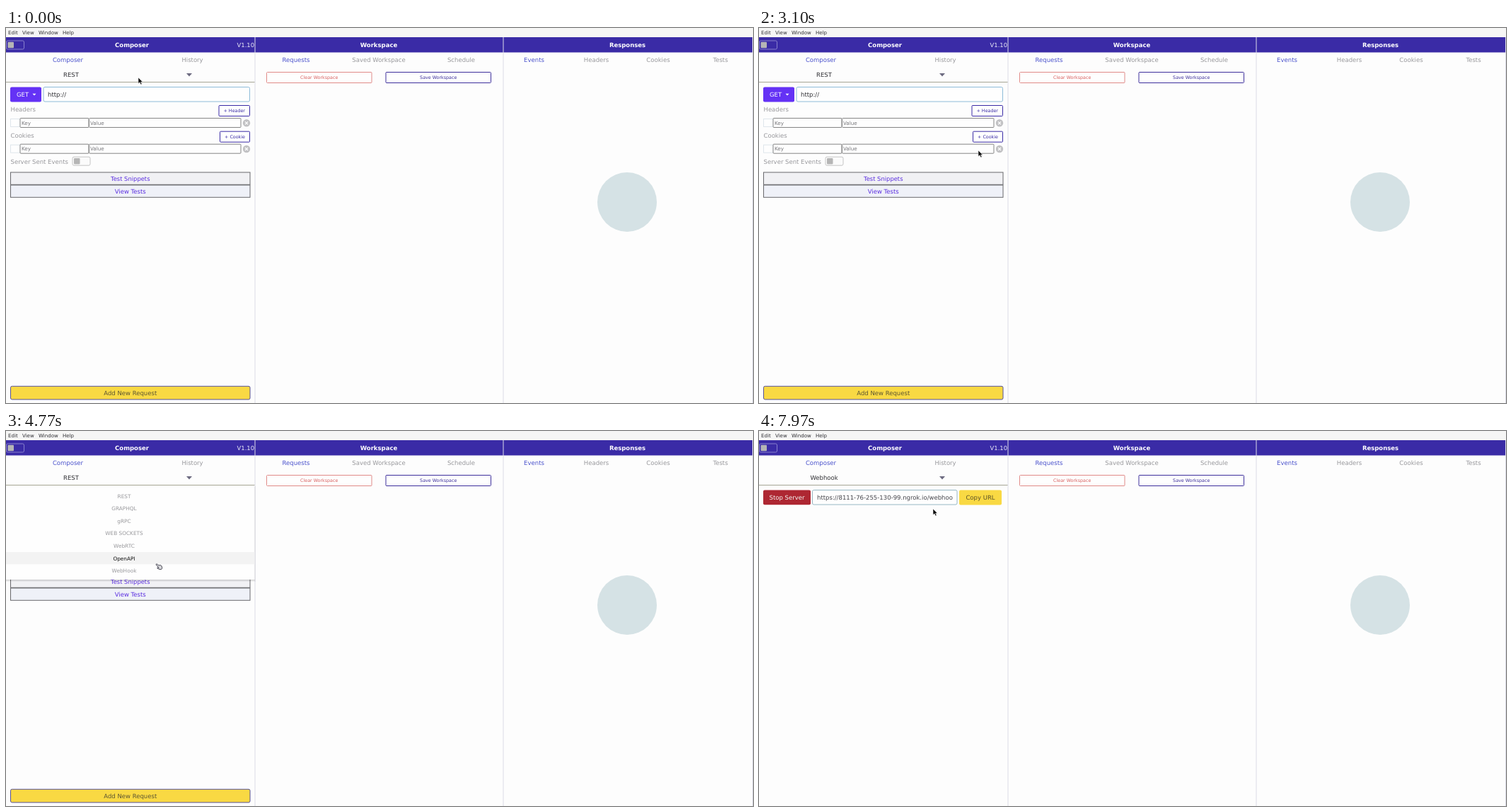
An HTML page for the animation above (8000 ms loop, 1056 by 530 pixels).

```html
<!DOCTYPE html>
<html lang="en">
<head>
<meta charset="utf-8">
<title>API composer</title>
<style>
  html, body { margin: 0; width: 100%; height: 100%; overflow: hidden; background: #fdfdfd; }
  svg { display: block; width: 1056px; height: 530px; font-family: "DejaVu Sans", sans-serif; text-rendering: geometricPrecision; }
</style>
</head>
<body>
<svg id="stage" viewBox="0 0 1056 530" xmlns="http://www.w3.org/2000/svg"></svg>
<script>
const LOOP = 8000;
const OPEN = 4030, HOVER = 4870, PICK = 5240, START = 6600, URL_SHOWN = 7200;
const INK = '#303034', GREY = '#98989c', BLUE = '#4a52cc', VIOLET = '#5b2ee0', NAVY = '#3a2ba6';

const stage = document.getElementById('stage');

function add(parent, tag, attrs, content) {
  const node = document.createElementNS(stage.namespaceURI, tag);
  for (const key in attrs) node.setAttribute(key, attrs[key]);
  if (content !== undefined) node.textContent = content;
  parent.appendChild(node);
  return node;
}
const group = (parent = stage) => add(parent, 'g', {});
const box = (parent, x1, y1, x2, y2, fill, stroke = 'none', rx = 0) =>
  add(parent, 'rect', { x: x1, y: y1, width: x2 - x1, height: y2 - y1, fill, stroke, rx });
// y is the middle of the capital letters
const text = (parent, x, y, content, fill, size = 8.5, anchor = 'middle', weight = 400) =>
  add(parent, 'text', { x, y: y + size * 0.365, fill, 'font-size': size, 'text-anchor': anchor, 'font-weight': weight }, content);
const show = (node, on) => node.setAttribute('visibility', on ? 'visible' : 'hidden');

function button(parent, x1, y1, x2, y2, label, color, fill = '#fefefe', stroke = color, size = 6.35, rx = 1) {
  box(parent, x1, y1, x2, y2, fill, stroke, rx);
  return text(parent, (x1 + x2) / 2, (y1 + y2) / 2, label, color, size);
}

function toggle(parent, x, y, fill, stroke) {
  box(parent, x, y, x + 25, y + 12, fill, stroke, 2);
  box(parent, x + 2, y + 1.7, x + 10.5, y + 10.3, '#b5b5b5', 'none', 1);
}

function fieldRow(parent, y, title, action, left) {
  text(parent, 6.5, y - 19, title, GREY, 8.5, 'start');
  button(parent, left, y - 24.5, 344.5, y - 9.5, action, NAVY);
  box(parent, 6.5, y - 5.5, 20, y + 5.5, '#fefefe', '#dfe6ec');
  box(parent, 20, y - 6.5, 117, y + 6.5, '#fefefe', '#858585', 1);
  box(parent, 117.5, y - 6.5, 332, y + 6.5, '#fefefe', '#858585', 1);
  text(parent, 22, y, 'Key', '#77777b', 7.2, 'start');
  text(parent, 119, y, 'Value', '#77777b', 7.2, 'start');
  add(parent, 'circle', { cx: 340, cy: y + 0.3, r: 5.2, fill: '#c2c2c4' });
  add(parent, 'path', { d: `M338 ${y - 1.7}l4 4m0-4l-4 4`, stroke: '#fff', 'stroke-width': 1.2 });
}

function drawShell() {
  box(stage, 0, 0, 1056, 530, '#fdfdfd');
  box(stage, 0, 0, 1056, 13, '#f6f6f5');
  box(stage, 0, 13, 1055, 34.5, NAVY);
  [['Edit', 3], ['View', 23], ['Window', 46], ['Help', 80]]
    .forEach(([label, x]) => text(stage, x, 6.5, label, INK, 7.05, 'start'));
  [['Composer', 178], ['Workspace', 527], ['Responses', 878.5]]
    .forEach(([label, x]) => text(stage, x, 23.5, label, '#fff', 8.5, 'middle', 700));
  text(stage, 351, 23.5, 'V1.10', '#eeeef8', 8.4, 'end');
  toggle(stage, 0.5, 18, NAVY, '#8880cc');

  [['Composer', 87.5, 1], ['History', 263.5], ['Requests', 410, 1], ['Saved Workspace', 527],
   ['Schedule', 643.5], ['Events', 746.5, 1], ['Headers', 834.5], ['Cookies', 922], ['Tests', 1010]]
    .forEach(([label, x, active]) => text(stage, x, 45, label, active ? BLUE : GREY));
  [351.5, 702.5, 1055].forEach(x => box(stage, x, 13, x + 1, 530, '#dcdce8'));

  button(stage, 368.5, 62.5, 517, 77.5, 'Clear Workspace', '#d9605f', '#fefefe', '#e08a88');
  button(stage, 537, 62.5, 685.5, 77.5, 'Save Workspace', '#3d2f9c');
  add(stage, 'circle', { cx: 878, cy: 246, r: 42, fill: '#d5e2e5' });
}

function drawRest() {
  const g = group();
  box(g, 6, 83.5, 50, 104.5, '#6432f5', 'none', 2);
  text(g, 23.5, 94, 'GET', '#fff');
  add(g, 'path', { d: 'M37.5 92.8h5l-2.5 2.7z', fill: '#fff' });
  box(g, 53, 83.5, 344.5, 104, '#fefefe', '#8dbbd8', 2);
  text(g, 59, 94, 'http://', INK, 8.5, 'start');
  fieldRow(g, 134, 'Headers', '+ Header', 301);
  fieldRow(g, 170.7, 'Cookies', '+ Cookie', 302.5);
  text(g, 6.5, 188.5, 'Server Sent Events', GREY, 8.5, 'start');
  toggle(g, 94, 182.2, '#fbfbfb', '#c4c4c4');
  button(g, 6.5, 204, 345, 221.3, 'Test Snippets', VIOLET, '#f1f1f4', '#68686c', 8.4, 0);
  button(g, 6.5, 222, 345, 239.3, 'View Tests', VIOLET, '#eff1f8', '#68686c', 8.5, 0);
  button(g, 6.5, 506.3, 345, 525, 'Add New Request', '#5c5532', '#f9d943', '#55519a', 8.5, 2);
  return g;
}

function drawWebhook() {
  const g = group();
  const server = box(g, 6, 83.5, 75.5, 105, '#0b8145', 'none', 2);
  const label = text(g, 40.5, 94, 'Start Server', '#f4faf6');
  const input = box(g, 77.5, 83.5, 280, 104, '#fefefe', '#96b8c4', 2);
  const url = text(g, 82, 94, 'https://8111-76-255-130-99.ngrok.io/webhoo', '#44444a', 8.5, 'start');
  button(g, 283, 83.5, 343, 104.5, 'Copy URL', '#5a5127', '#f9d943', 'none', 8.5, 2);
  return { g, server, label, input, url };
}

function drawMenu() {
  const g = group();
  [3, 2, 1].forEach(d => add(g, 'rect', { x: 0, y: 78, width: 351 + d * 0.6, height: 132 + d, fill: '#000', opacity: 0.05 }));
  box(g, 0, 77, 351.5, 210, '#fefefe');
  const row = box(g, 0, 171, 351.5, 188.3, '#f3f3f3');
  const items = ['REST', 'GRAPHQL', 'gRPC', 'WEB SOCKETS', 'WebRTC', 'OpenAPI', 'WebHook']
    .map((label, i) => text(g, 167, 92 + i * 17.58, label, GREY, 7.35));
  return { g, row, items };
}

function drawCursor() {
  const g = group();
  const arrow = add(g, 'path', {
    d: 'M0 0V8.6L2 6.8L3.6 10L5.1 9.3L3.6 6.2H6.2Z',
    fill: '#0c0c0c', stroke: '#fff', 'stroke-width': 0.5
  });
  const hand = add(g, 'path', {
    d: 'M0.2 0.2Q1-.4 1.8.3L4 2L6.2 1.5L8 2.8L8.8 5.8L7.6 7.6L5 7.5L2 6.1L1.9 5.1L4 5.2L.3 1.3Z',
    fill: '#d8d8dc', stroke: '#3c3c48', 'stroke-width': 0.9, 'stroke-linejoin': 'round'
  });
  return { g, arrow, hand };
}

// time, x, y of the pointer tip
const PATH = [
  [0, 187, 70], [1670, 108, 67], [1930, 104, 70], [2270, 104, 70], [3100, 310, 173],
  [3250, 321, 168], [3600, 265, 68], [3770, 265, 68], [3830, 263, 66], [4030, 263, 66],
  [4770, 212, 188], [4900, 208, 195], [5240, 208, 195], [6350, 64, 100], [7500, 64, 100], [7970, 246, 110]
];

function pointer(t) {
  const i = PATH.findIndex(p => p[0] > t);
  if (i < 0) return PATH[PATH.length - 1].slice(1);
  const [t0, x0, y0] = PATH[i - 1], [t1, x1, y1] = PATH[i];
  const k = (t - t0) / (t1 - t0), e = k * k * (3 - 2 * k);
  return [x0 + (x1 - x0) * e, y0 + (y1 - y0) * e];
}

const mix = (a, b, k) => `rgb(${a.map((v, i) => Math.round(v + (b[i] - v) * k))})`;

drawShell();
const rest = drawRest();
const hook = drawWebhook();
const mode = text(stage, 92, 66, 'REST', INK);
add(stage, 'path', { d: 'M255 64h8l-4 4.5z', fill: '#6c6a80' });
box(stage, 0, 76, 351.5, 77, '#a5a594');
const menu = drawMenu();
const cursor = drawCursor();

function render(t) {
  const picked = t >= PICK, opened = t >= OPEN && !picked, running = t >= START;
  const [x, y] = pointer(t);

  show(rest, !picked);
  show(hook.g, picked);
  show(hook.url, t >= URL_SHOWN);
  mode.textContent = picked ? 'Webhook' : 'REST';

  const fade = Math.min(1, Math.max(0, (t - START) / 130));
  hook.server.setAttribute('fill', mix([11, 129, 69], [174, 39, 50], fade));
  hook.server.setAttribute('width', running ? 67 : 69.5);
  hook.server.setAttribute('height', running ? 20.8 : 21.5);
  hook.label.textContent = running ? 'Stop Server' : 'Start Server';
  hook.label.setAttribute('x', running ? 39.5 : 40.5);
  hook.input.setAttribute('x', running ? 75.5 : 77.5);
  hook.input.setAttribute('width', running ? 204.5 : 202.5);

  const active = t >= HOVER ? 6 : Math.floor((y - 83.2) / 17.58);
  show(menu.g, opened);
  menu.items.forEach((item, i) => {
    item.setAttribute('visibility', 'inherit');
    item.setAttribute('fill', i === active ? '#111' : GREY);
  });
  menu.row.setAttribute('y', 83.2 + active * 17.58);
  menu.row.setAttribute('visibility', active >= 0 ? 'inherit' : 'hidden');
  hook.url.setAttribute('visibility', picked && t >= URL_SHOWN ? 'inherit' : 'hidden');

  const onArrow = t >= 3770 && t < OPEN;
  const onServer = picked && x < (running ? 73 : 75.5) && y < 105;
  const hand = onArrow || opened || onServer;
  cursor.g.setAttribute('transform', `translate(${x.toFixed(2)} ${y.toFixed(2)})`);
  show(cursor.arrow, !hand);
  show(cursor.hand, hand);
}

function tick() {
  render(performance.now() % LOOP);
  requestAnimationFrame(tick);
}
tick();
</script>
</body>
</html>
```
